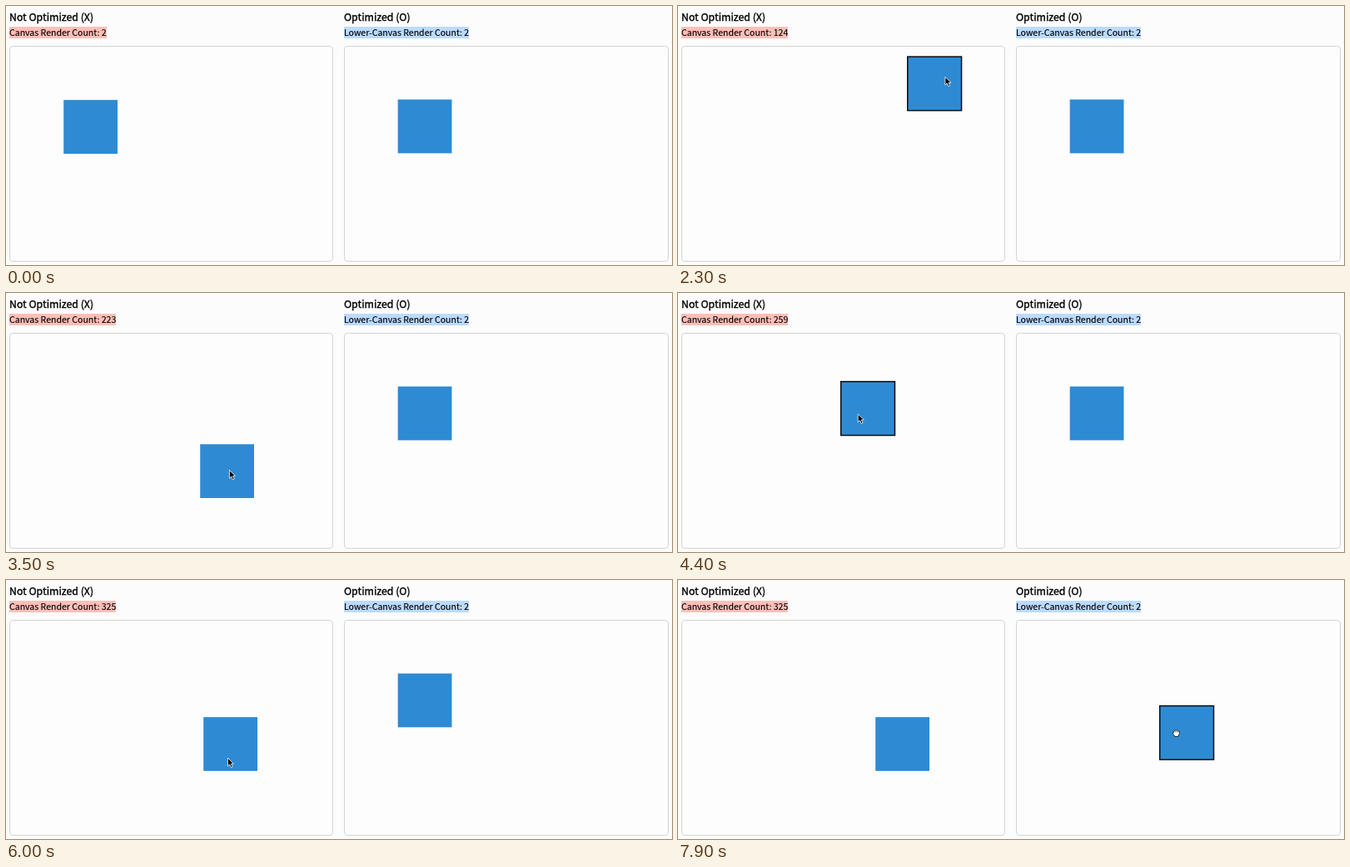
An HTML page for the animation above (8000 ms loop, 800 by 312 pixels).

```html
<!DOCTYPE html>
<html lang="en">
<head>
<meta charset="utf-8">
<title>Render count comparison</title>
<style>
  html, body { margin: 0; width: 100%; height: 100%; overflow: hidden; background: #fdfcfd; }
  body { position: relative; color: #000; font-family: "Noto Sans CJK KR", "Noto Sans CJK JP", "Noto Sans CJK SC", "Noto Sans", sans-serif; }
  .title, .count { position: absolute; white-space: pre; }
  .title { top: 5px; font-size: 12.3px; line-height: 16px; -webkit-text-stroke: .35px #000; }
  .count { top: 25px; height: 14px; font-size: 10.55px; line-height: 13px; -webkit-text-stroke: .15px #000; }
  .left { left: 4px; }
  .right { left: 406px; }
  .count.left { background: #ffbfb8; }
  .count.right { background: #bbdbff; }
  svg { position: absolute; left: 0; top: 0; }
  .panel { fill: #fdfdfe; stroke: #d5d5d7; }
  .square { fill: #2e8bd3; stroke: none; }
  .square.active { stroke: #0a0d12; stroke-width: 1.5; }
  .cursor { stroke: #fff; stroke-width: .8; stroke-linejoin: round; }
  #hand { fill: #fff; stroke: #111; }
</style>
</head>
<body>
<div class="title left">Not Optimized (X)</div>
<div class="count left">Canvas Render Count: <span id="renders">2</span></div>
<div class="title right">Optimized (O)</div>
<div class="count right">Lower-Canvas Render Count: 2</div>
<svg width="800" height="312" viewBox="0 0 800 312">
  <rect class="panel" x="4.5" y="48.5" width="388" height="259" rx="3.5"/>
  <rect class="panel" x="406.5" y="48.5" width="389" height="259" rx="3.5"/>
  <rect class="square" id="leftSquare" width="64.8" height="64.8"/>
  <rect class="square" id="rightSquare" width="64.8" height="64.8"/>
  <path class="cursor" id="arrow" d="M-.6 -.6V9.1L1.7 7L3.4 10.8L5.2 10L3.5 6.4H6.5Z"/>
  <path class="cursor" id="hand" d="M-3.2 -2.4Q-2.6 -4 -1.5 -3.2Q-.6 -4.6 .5 -3.4Q1.7 -4.2 2.4 -2.8Q4 -3 3.9 -1Q3.8 1.5 2.6 2.6V4H-2.2V2.8Q-4.6 .8 -4 -.3Q-3.4 -.8 -3.2 -.4ZM-1.4 -2.7V-1.2M.5 -2.8V-1.2M2.3 -2.3V-1"/>
</svg>
<script>
const LOOP = 8000, STEP = 100;
const LAG = 100; // a dragged square trails the pointer by this many ms
const SHOWN = 400;
const byId = id => document.getElementById(id);
const clamp = (v, min, max) => Math.min(max, Math.max(min, v));
const ease = u => u * u * (3 - 2 * u);
const move = (from, to, x, y) => ({ from, to, x, y });

// The pointer rests between moves.
const entry = { x: 132, y: 41 };
const moves = [
  move(500, 1200, 105, 145),
  move(1280, 1600, 187, 179),
  move(1700, 2300, 321.5, 86),
  move(2300, 3050, 268.5, 227),
  move(3050, 3400, 269, 214),
  move(3500, 3750, 263, 232),
  move(3800, 4050, 238, 171),
  move(4050, 4700, 200, 127),
  move(4800, 5400, 262, 227),
  move(5400, 5650, 267, 215),
  move(6000, 6600, 567, 299),
  move(6600, 7200, 490.5, 145.5),
  move(7500, 7700, 627, 172),
  move(7700, 7800, 598.5, 184.5)
];

const left = {
  node: byId("leftSquare"), x: 69.2, y: 113.2,
  drags: [
    { from: 1280, to: 3400, rate: .12, renders: 221 },
    { from: 3800, to: 5700, rate: .06, renders: 102 }
  ]
};
const right = {
  node: byId("rightSquare"), x: 470.7, y: 112.6,
  drags: [{ from: 7500, to: LOOP }]
};
const arrow = byId("arrow"), hand = byId("hand"), renders = byId("renders");

function pointerAt(t) {
  let { x, y } = entry;
  for (const m of moves) {
    const u = ease(clamp((t - m.from) / (m.to - m.from), 0, 1));
    x += (m.x - x) * u;
    y += (m.y - y) * u;
  }
  return { x, y };
}

function place(node, { x, y }) {
  node.setAttribute("transform", `translate(${x.toFixed(2)} ${y.toFixed(2)})`);
}

function drawSquare({ node, x, y, drags }, t) {
  for (const { from, to } of drags) {
    const grab = pointerAt(from), now = pointerAt(clamp(t - LAG, from, to));
    x += now.x - grab.x;
    y += now.y - grab.y;
  }
  place(node, { x, y });
  node.classList.toggle("active", drags.some(d => t > d.from && t < d.to + LAG));
}

function draw(t) {
  const pointer = pointerAt(t);
  const grabbing = t > right.drags[0].from;
  drawSquare(left, t);
  drawSquare(right, t);
  place(arrow, pointer);
  place(hand, pointer);
  arrow.style.display = t >= SHOWN && !grabbing ? "" : "none";
  hand.style.display = grabbing ? "" : "none";
  renders.textContent = left.drags.reduce(
    (sum, d) => sum + Math.round(clamp((t - d.from) * d.rate, 0, d.renders)), 2);
}

const start = performance.now();
function tick() {
  const elapsed = Math.max(0, performance.now() - start) % LOOP;
  draw(Math.floor(elapsed / STEP) * STEP);
  requestAnimationFrame(tick);
}
tick();
</script>
</body>
</html>
```
